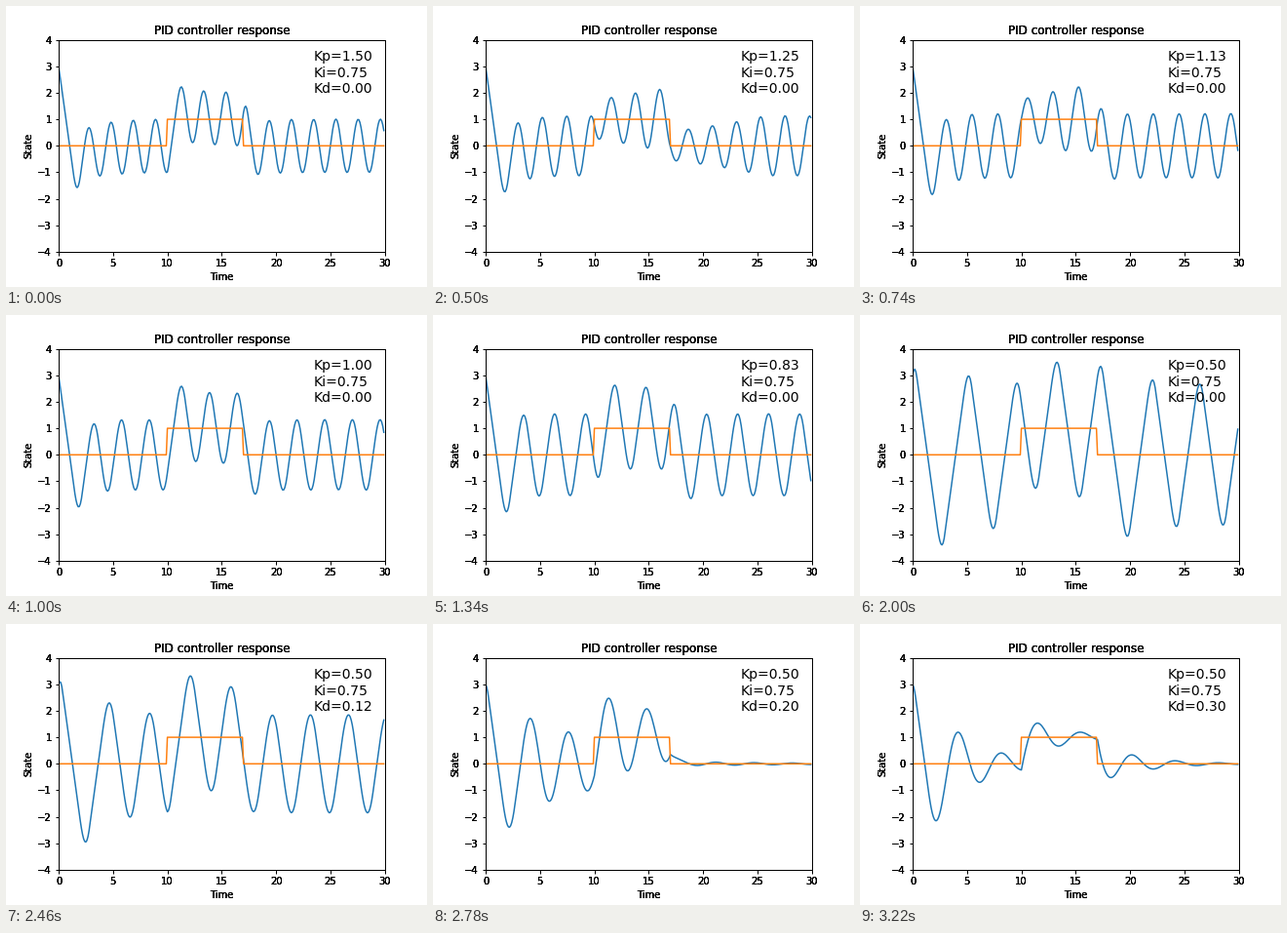
Write a matplotlib script that moves like this. It is 432x288 px and loops after 5000 ms.

```python
import matplotlib.pyplot as plt
import numpy as np
from matplotlib.animation import FuncAnimation
from matplotlib.transforms import IdentityTransform

FRAMES, INTERVAL = 250, 20
LAST = 161                       # tuning is finished from here on
DT, STEPS = 0.1, 300
GAIN, DRAG, VMAX = 6.0, 0.4, 3.0

time = np.arange(STEPS) * DT
target = np.where((np.arange(STEPS) >= 100) & (np.arange(STEPS) < 170), 1.0, 0.0)
goals = target.tolist()


def gains(i):
    """Kp falls first, then Kd rises."""
    i = min(i, LAST)
    return 1.5 - min(i, 100) / 100, 0.75, max(i - 100, 0) / 200


def simulate(kp, ki, kd, v):
    """Run the loop from x = 3 and return the path and the final speed."""
    x, total, last = 3.0, 0.0, None
    path = []
    for goal in goals:
        path.append(x)
        err = goal - x
        total += err * DT
        slope = 0.0 if last is None else (err - last) / DT
        last = err
        u = kp * err + ki * total + kd * slope
        v += (GAIN * u - DRAG * v) * DT
        v = max(-VMAX, min(VMAX, v))
        x += v * DT
    return path, v


# The speed carries over from one run to the next.
paths, speed = [], 0.0
for i in range(LAST + 1):
    path, speed = simulate(*gains(i), speed)
    paths.append(path)

plt.rcParams.update({
    "font.family": "DejaVu Sans", "font.size": 10, "axes.linewidth": 1,
    "xtick.major.width": 1, "ytick.major.width": 1,
})
fig = plt.figure(figsize=(6, 4), dpi=72, facecolor="white")
ax = fig.add_axes([0.125, 0.125, 0.775, 0.755])
ax.set(xlim=(0, 30), ylim=(-4, 4), xticks=range(0, 31, 5), yticks=range(-4, 5),
       xlabel="Time", ylabel="State")
ax.set_title("PID controller response", fontsize=12)

state, = ax.plot(time, paths[0], color="tab:blue", lw=1.5)
ax.plot(time, target, color="tab:orange", lw=1.5)
note = ax.text(0.78, 0.95, "", transform=ax.transAxes, fontsize=14, va="top")


def thicken(labels, copies):
    """Lay copies over the labels so that their soft edges darken."""
    fig.canvas.draw()
    for label in labels:
        x, y = label.get_transform().transform(label.get_position())
        for _ in range(copies):
            fig.text(x, y, label.get_text(), transform=IdentityTransform(),
                     fontsize=label.get_fontsize(), ha=label.get_ha(),
                     va=label.get_va(), rotation=label.get_rotation(),
                     rotation_mode=label.get_rotation_mode())


thicken([ax.title, ax.xaxis.label, ax.yaxis.label,
         *ax.get_xticklabels(), *ax.get_yticklabels()], 3)


def draw(i):
    state.set_ydata(paths[min(i, LAST)])
    note.set_text("Kp={:.2f}\nKi={:.2f}\nKd={:.2f}".format(*gains(i)))
    return state, note


def reset():
    return draw(0)


anim = FuncAnimation(fig, draw, frames=FRAMES, init_func=reset,
                     interval=INTERVAL, repeat=True, repeat_delay=0)
plt.show()
```
